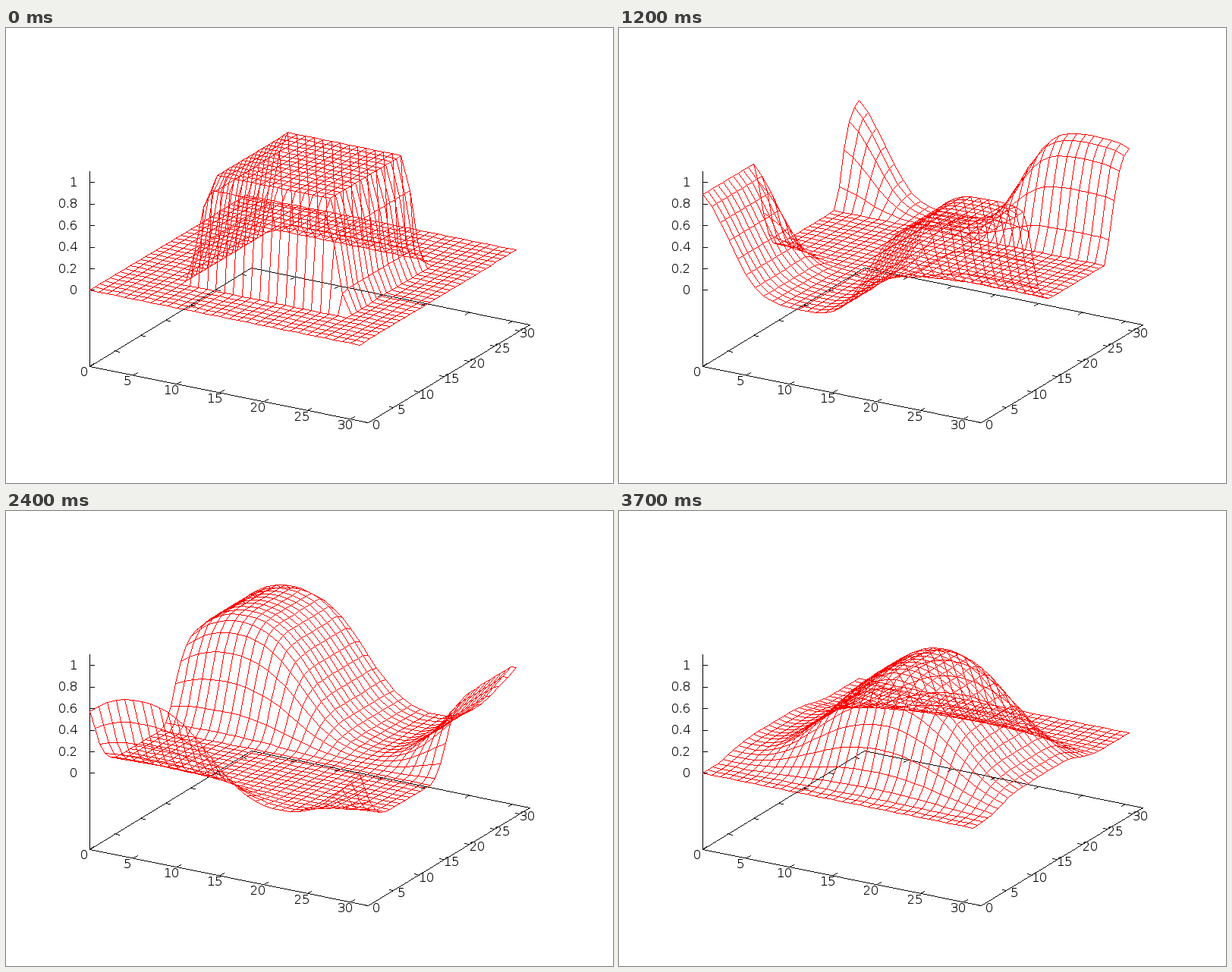
Recreate the animation shown at these times as a matplotlib script. Size 800 px wide and 600 px high, loop 3.8 s.

```python
import numpy as np
import matplotlib.pyplot as plt
from matplotlib.animation import FuncAnimation

plt.rcParams["text.hinting"] = "native"
plt.rcParams["text.hinting_factor"] = 1

W, H, DPI = 800, 600, 100
N, FRAMES, INTERVAL = 32, 38, 100
COURANT = 0.89
BLACK, RED = (0, 0, 0), (255, 0, 0)

# Screen projection: data origin, and the vectors per unit along x, y and z.
ORIGIN = np.array([110.6, 345.99])
X_AXIS = np.array([367.0, 74.4]) / N
Y_AXIS = np.array([213.0, -129.3]) / N
Z_AXIS = np.array([0.0, -142.4])
Z_BASE, Z_TOP = -0.703, 1.1
TICK = 6


def project(x, y, z):
    x, y, z = (np.asarray(v, float)[..., None] for v in (x, y, z))
    return ORIGIN + x * X_AXIS + y * Y_AXIS + z * Z_AXIS


def upwind(u, c, direction, axis):
    return (1 - c) * u + c * np.roll(u, direction, axis)


def advance(u):
    """One split step: half in x, full in -y, half in x."""
    u = upwind(u, COURANT / 2, 1, 0)
    u = upwind(u, COURANT, -1, 1)
    return upwind(u, COURANT / 2, 1, 0)


def advect(steps):
    u = np.zeros((N, N))
    u[N // 4:3 * N // 4, N // 4:3 * N // 4] = 1
    for _ in range(steps):
        u = advance(u)
    return u


def draw_lines(canvas, starts, ends, color):
    """Draw one-pixel lines without antialiasing."""
    a = np.floor(starts).reshape(-1, 2)
    delta = np.floor(ends).reshape(-1, 2) - a
    length = np.maximum(np.abs(delta).max(axis=1), 1)
    t = np.minimum(np.arange(length.max() + 1) / length[:, None], 1)
    pixels = np.floor(a[:, None] + delta[:, None] * t[..., None] + 0.5).astype(int)
    canvas[pixels[..., 1], pixels[..., 0]] = color


def label(text, x, y, align="center"):
    ax.text(x, y, text, ha=align, va="baseline", color="black",
            family="DejaVu Sans", fontsize=16 * 72 / DPI)


def draw_box(canvas):
    corners = project([0, N, N, 0, 0], [0, 0, N, N, 0], Z_BASE)
    pole = project([0, 0], [0, 0], [Z_BASE, Z_TOP])
    draw_lines(canvas, corners[:-1], corners[1:], BLACK)
    draw_lines(canvas, pole[:1], pole[1:], BLACK)

    along_x, along_y = (TICK * v / np.hypot(*v) for v in (X_AXIS, Y_AXIS))
    for v in range(0, N, 5):
        front, back = project(v, 0, Z_BASE), project(v, N, Z_BASE)
        left, right = project(0, v, Z_BASE), project(N, v, Z_BASE)
        for point, tick in ((front, along_y), (back, -along_y),
                            (left, along_x), (right, -along_x)):
            draw_lines(canvas, point, point + tick, BLACK)
        label(str(v), front[0] - 7.5, front[1] + 13.4)
        label(str(v), right[0] + 10, right[1] + 8.6)

    for i in range(6):
        point = project(0, 0, i / 5)
        draw_lines(canvas, point, point + [TICK, 0], BLACK)
        label(f"{i / 5:g}", 94, point[1] + 5, "right")


fig = plt.figure(figsize=(W / DPI, H / DPI), dpi=DPI, facecolor="white")
ax = fig.add_axes([0, 0, 1, 1])
ax.axis("off")

background = np.full((H, W, 3), 255, np.uint8)
draw_box(background)
picture = ax.imshow(background, extent=(0, W, H, 0), aspect="auto",
                    interpolation="nearest")
grid_x, grid_y = np.meshgrid(np.arange(N), np.arange(N), indexing="ij")


def update(frame):
    canvas = background.copy()
    points = project(grid_x, grid_y, advect(frame + 1))
    draw_lines(canvas, points[:-1], points[1:], RED)
    draw_lines(canvas, points[:, :-1], points[:, 1:], RED)
    picture.set_data(canvas)
    return [picture]


anim = FuncAnimation(fig, update, frames=FRAMES, interval=INTERVAL,
                     repeat=True, repeat_delay=0)
plt.show()
```
